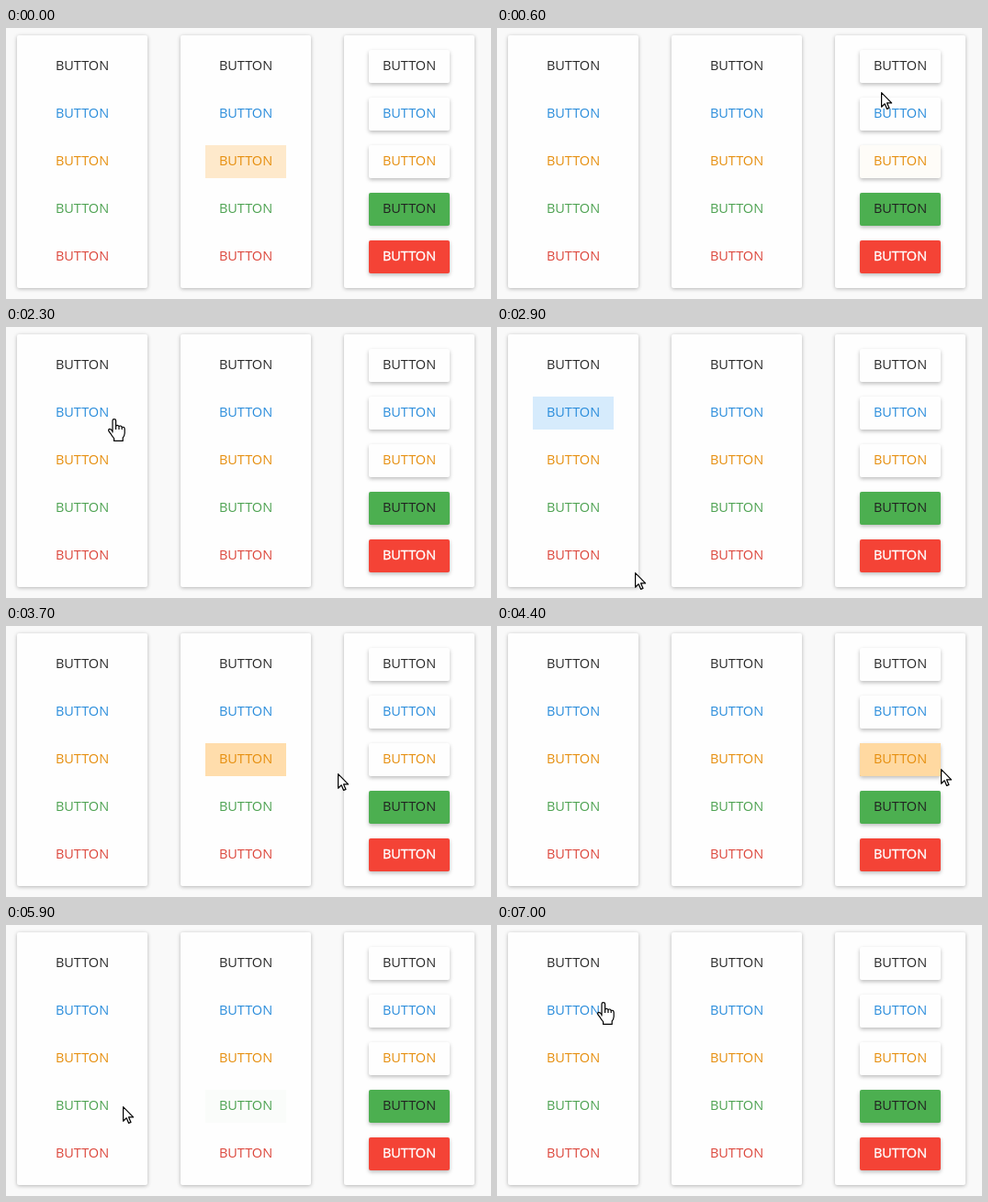
An HTML page for the animation above (7.1 s loop, 528 by 296 pixels).

```html
<!DOCTYPE html>
<html lang="en">
<head>
<meta charset="utf-8">
<title>Buttons</title>
<style>
html, body { margin: 0; width: 528px; height: 296px; overflow: hidden; background: #f9f9f9; }
body { position: relative; }
.card {
  position: absolute; top: 8px; width: 142px; height: 276px;
  border-radius: 2px; background: #fefefe;
  box-shadow: 0 1px 4px rgba(0, 0, 0, .28);
}
.btn {
  position: absolute; left: 27px; width: 88px; height: 36px;
  font: 14.5px/34px "Open Sans", "Noto Sans", sans-serif;
  text-align: center; color: color-mix(in srgb, var(--ink) 85%, #555);
}
.raised .btn { border-radius: 2px; background: #fefefe; box-shadow: 0 2px 4px rgba(0, 0, 0, .26); }
.raised .btn.fill { background: var(--ink); color: #212121; }
.raised .btn.light { color: #fff; -webkit-text-stroke: .4px #fff; }
.tint, .ripple { position: absolute; inset: 0; background: var(--ink); opacity: 0; }
.label { position: relative; }
svg { position: absolute; left: 0; top: 0; overflow: visible; }
svg path { fill: #fff; stroke: #000; stroke-width: 1.2; stroke-linejoin: round; }
svg .lines { fill: none; }
</style>
</head>
<body>
<svg width="1" height="1">
  <path id="arrow" d="M.6 .6V16.2L4.2 12.8L6.6 18.4L9 17.4L6.6 11.9H11.6Z"/>
  <g id="hand">
    <path d="M-2 14V1.2Q-2-.4-.2-.4T1.6 1.2V7Q3.2 5.4 5 7.4Q7 6.2 8.2 8.4Q11 7.6 11.2 10.6V15Q11 18 9.2 20V23.4H-.4V20.6Q-2.6 18.4-4 15.6L-6.2 12.6Q-6.8 10.6-5 10.4Q-3.6 10.4-2 13Z"/>
    <path class="lines" d="M1.6 7V11M5 7.4V11M8.2 8.4V11"/>
  </g>
</svg>
<script>
const LOOP = 7100, STEP = 100, SHOWN = 100;
const INKS = ['#212121', '#2196f3', '#ff9800', '#4caf50', '#f44336'];
const CLICKS = [2500, 3400, 4100, 6300];

// time, x, y of the pointer tip; it stays hidden until SHOWN
const PATH = [
  [0, 261, 146], [100, 509, 282], [700, 400, 28], [1000, 262, 90], [1300, 248, 104],
  [2300, 118, 101], [2500, 104, 96], [2900, 150, 268], [3400, 258, 148], [3700, 361, 161],
  [4100, 440, 150], [4500, 497, 158], [5000, 397, 167], [5900, 127, 198],
  [6300, 104, 200], [7000, 116, 85]
];

const clamp = v => Math.min(1, Math.max(0, v));
const add = (parent, cls) => {
  const el = document.createElement('div');
  el.className = cls;
  return parent.appendChild(el);
};

const svg = document.querySelector('svg');
const [arrow, hand] = svg.children;

const buttons = [0, 1, 2].flatMap(col => {
  const card = add(document.body, col === 2 ? 'card raised' : 'card');
  const left = 12 + 178 * col;
  card.style.left = left + 'px';
  return INKS.map((ink, row) => {
    const btn = add(card, 'btn' + (row > 2 ? ' fill' : '') + (row > 3 ? ' light' : ''));
    const top = 16 + 52 * row;
    btn.style.top = top + 'px';
    btn.style.setProperty('--ink', ink);
    const tint = add(btn, 'tint'), ripple = add(btn, 'ripple');
    add(btn, 'label').textContent = 'BUTTON';
    return { x: left + 27, y: 8 + top, glow: col ? .2 : 0, tint, ripple };
  });
});
document.body.append(svg);

function tipAt(t) {
  const i = Math.max(1, PATH.findIndex(p => p[0] >= t));
  const [t0, x0, y0] = PATH[i - 1], [t1, x1, y1] = PATH[i];
  const k = clamp((t - t0) / (t1 - t0));
  return [x0 + (x1 - x0) * k, y0 + (y1 - y0) * k].map(Math.round);
}

const isOver = (b, [x, y]) => x >= b.x && x < b.x + 88 && y >= b.y && y < b.y + 36;

// Share of the last four steps spent over the button, eased
function hover(b, t) {
  const hits = [0, 1, 2, 3].filter(n => isOver(b, tipAt(t - n * STEP)));
  return (hits.length / 4) ** 1.5;
}

function drawRipple(b, t) {
  const start = CLICKS.find(c => t >= c && t < c + 600 && isOver(b, tipAt(c)));
  b.ripple.style.opacity = start ? .27 * clamp((start + 600 - t) / 300) : 0;
  if (!start) return;
  const [x, y] = tipAt(start), r = 10 + 85 * clamp((t - start) / 300);
  b.ripple.style.clipPath = `circle(${r}px at ${x - b.x}px ${y - b.y}px)`;
}

function draw(t) {
  const tip = tipAt(t);
  for (const b of buttons) {
    b.tint.style.opacity = b.glow * hover(b, t);
    drawRipple(b, t);
  }
  const pointing = buttons.some(b => isOver(b, tip));
  svg.style.transform = `translate(${tip[0]}px, ${tip[1]}px)`;
  svg.style.display = t < SHOWN ? 'none' : '';
  arrow.style.display = pointing ? 'none' : '';
  hand.style.display = pointing ? '' : 'none';
}

const begin = performance.now();
function tick() {
  const t = (performance.now() - begin) % LOOP;
  draw(Math.floor(t / STEP) * STEP);
  requestAnimationFrame(tick);
}
tick();
</script>
</body>
</html>
```
